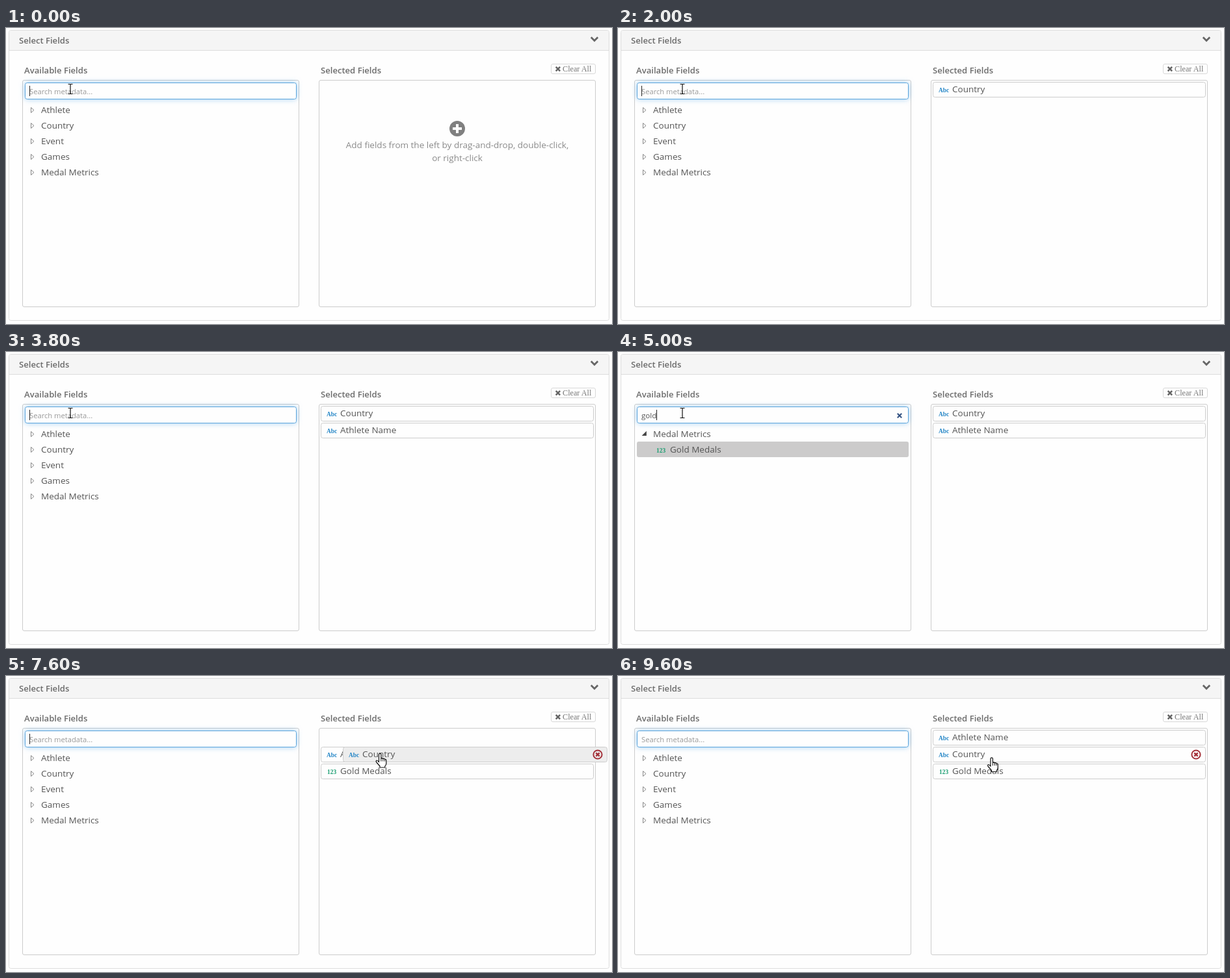
Recreate the animation shown at these times as an HTML page. Size 932 by 456 pixels, loop 9.8 s.

```html
<!DOCTYPE html>
<html lang="en">
<head>
<meta charset="utf-8">
<title>Select Fields</title>
<style>
  html, body { margin: 0; width: 100%; height: 100%; overflow: hidden; background: #fefefe; }
  svg { display: block; width: 932px; height: 456px; }
  text { font: 13.5px "Open Sans", "Noto Sans", sans-serif; fill: #555; white-space: pre; }
  .title { font-size: 13.1px; font-weight: 600; fill: #6b6b6b; }
  .search { font-size: 11.6px; }
  .prompt { font-size: 11.2px; fill: #999; }
  .hint { fill: #8a8a8a; text-anchor: middle; }
  .clear { font: 12.2px "Liberation Serif", Tinos, serif; fill: #777; }
  .kind { font: bold 9.4px "Liberation Serif", Tinos, serif; }
  .Abc { fill: #2385c6; }
  .n123 { fill: #1b9e72; }
  .box { fill: #fefefe; stroke: #ccc; }
  .glow { fill: #fefefe; stroke: #5aa4dc; filter: drop-shadow(0 0 4px rgba(102, 175, 233, .6)); }
  .line { fill: none; }
</style>
</head>
<body>
<svg viewBox="0 0 932 456">
  <rect class="box" x="4.5" y="3.5" width="923" height="447" rx="3" style="stroke:#ddd"/>
  <path d="M5 34V7q0-3 3-3H924q3 0 3 3V34z" fill="#f5f5f5"/>
  <path d="M5 34.5H927" stroke="#ddd"/>
  <text class="title" x="20" y="24">Select Fields</text>
  <path class="line" d="M899.8 14.2L905 19.4L910.2 14.2" stroke="#666" stroke-width="2.8"/>
  <text class="title" x="28" y="70">Available Fields</text>
  <text class="title" x="484" y="70">Selected Fields</text>
  <rect class="box" x="838.5" y="55.5" width="68" height="15" rx="2.5" style="stroke:#d8d8d8"/>
  <path d="M845.7 59.9l6.4 6.4m0-6.4l-6.4 6.4" stroke="#666" stroke-width="2.6"/>
  <text class="clear" x="856" y="67">Clear All</text>
  <rect class="box" x="25.5" y="80.5" width="425" height="349" rx="2.5"/>
  <rect class="box" x="481.5" y="80.5" width="425" height="349" rx="2.5"/>
  <rect class="glow" x="29.5" y="84.5" width="417" height="25" rx="3"/>
  <g id="tree"></g>
  <text id="prompt" class="prompt" x="36" y="102">Search metadata...</text>
  <text id="query" class="search" x="36" y="102"></text>
  <path id="caret" d="M.5 89V105" stroke="#222"/>
  <path id="wipe" d="M429.8 94.8l6.4 6.4m0-6.4l-6.4 6.4" stroke="#2f4f7f" stroke-width="2"/>
  <g id="hint">
    <circle cx="694" cy="155" r="12" fill="#808080"/>
    <path d="M687 155h14m-7-7v14" stroke="#fefefe" stroke-width="4"/>
    <text class="hint" x="694" y="185">Add fields from the left by drag-and-drop, double-click,</text>
    <text class="hint" x="694" y="205">or right-click</text>
  </g>
  <g id="items"></g>
  <path id="beam" class="line" d="M-3.5 -7.5h2.5q1 0 1 1q0 -1 1 -1h2.5M0 -6.5V6.5M-3.5 7.5h2.5q1 0 1 -1q0 1 1 1h2.5" stroke="#111" stroke-width="1.2"/>
  <g id="hand" stroke="#111" stroke-linejoin="round">
    <path fill="#fff" stroke-width="1.2" d="M5 14V2.5a1.7 1.7 0 0 1 3.4 0V8.5q1.6-1.2 3 .5q1.6-.8 2.7 .8q2-.3 2.2 1.7V16q0 3-2 4.5V22.5H6.5V20.5L1 14q-1-2 .8-2.5q1 0 3.2 2.5z"/>
    <path class="line" d="M8.4 8.5V13M11.4 9V13M14.1 10V13"/>
  </g>
</svg>
<script>
const LOOP = 9800, STEP = 200, ROW = 26;
const GRAB = 6800, SWAP = 8000, DROP = 8400;
const GROUPS = ['Athlete', 'Country', 'Event', 'Games', 'Medal Metrics'];

const FIELDS = [
  { group: 'Country', kind: 'Abc', label: 'Country', added: 1600 },
  { group: 'Athlete', kind: 'Abc', label: 'Athlete Name', added: 3600 },
  { group: 'Medal Metrics', kind: '123', label: 'Gold Medals', added: 5400 }
];

const TYPED = [
  [0, ''], [200, 'c'], [400, 'cou'], [600, 'count'], [800, 'country'], [1600, ''],
  [2600, 'a'], [2800, 'athl'], [3000, 'athlete'], [3200, 'athlete na'], [3600, ''],
  [4000, 'g'], [4200, 'go'], [4400, 'gol'], [4600, 'gold'], [5400, '']
];

const CARET_OFF = [[1200, 1400], [2200, 2600], [6600, 7000], [7800, 8000], [8600, 9000], [9600, 9800]];

// time, x, y: text cursor centre first, then the hand's top left corner
const BEAM = [[0, 99, 94], [5600, 130, 94], [5800, 230, 96], [6000, 390, 100]];
const HAND = [
  [6200, 546, 108], [6400, 562.5, 112], [6600, 545, 102], [GRAB, 534.5, 92.5],
  [7000, 558.5, 99.5], [7200, 574.5, 106.5], [7400, 573.5, 113.5], [7600, 568.5, 118.5],
  [7800, 570, 122], [SWAP, 569, 125], [8200, 568, 125]
];

const $ = id => document.getElementById(id);
const at = (table, t) => table.filter(row => row[0] <= t).pop();
const show = (id, on) => $(id).setAttribute('display', on ? 'inline' : 'none');
const move = (id, x, y) => $(id).setAttribute('transform', `translate(${x} ${y})`);
const text = (x, y, label, cls = '') => `<text x="${x}" y="${y}" class="${cls}">${label}</text>`;
const kindMark = (x, y, kind) => text(x, y, kind, kind === 'Abc' ? 'kind Abc' : 'kind n123');

function treeMarkup(query) {
  const hit = query.length > 2 && FIELDS.find(f => f.label.toLowerCase().startsWith(query));
  if (!hit) {
    return GROUPS.map((name, i) => {
      const y = 131 + i * 24;
      return `<path class="line" d="M38.5 ${y - 8.5}l4.5 4l-4.5 4z" stroke="#888"/>` + text(54, y, name);
    }).join('');
  }
  return '<path d="M43.8 121.8V129H36.6z" fill="#444"/>' + text(54, 131, hit.group) +
    '<rect x="29" y="138" width="418" height="24" rx="3" fill="#cccbcb"/>' +
    kindMark(59, 155, hit.kind) + text(80, 155, hit.label);
}

function itemMarkup(field, x, y, width, fill, hover) {
  const cx = x + width - 14.5;
  const cross = `<g class="line" stroke="#a5333b" stroke-width="2">
    <circle cx="${cx}" cy="${y + 11.5}" r="6.6"/>
    <path d="M${cx - 2.7} ${y + 8.8}l5.4 5.4m0-5.4l-5.4 5.4" stroke-width="2.4"/></g>`;
  return `<rect class="box" x="${x}" y="${y}" width="${width}" height="23" rx="3" style="fill:${fill}"/>` +
    kindMark(x + (field.kind === 'Abc' ? 8.5 : 9.5), y + 15.5, field.kind) +
    text(x + 29.5, y + 15.5, field.label) + (hover ? cross : '');
}

function itemsMarkup(t, hand) {
  const list = FIELDS.filter(f => f.added <= t);
  if (t >= SWAP) list.unshift(list.splice(1, 1)[0]);
  const dragging = t > GRAB && t < DROP;
  const hoverRow = hand && !dragging ? Math.floor((hand[2] - 82) / ROW) : -1;
  const rows = list.map((f, i) => dragging && f === FIELDS[0] ? '' :
    itemMarkup(f, 484.5, 83.5 + i * ROW, 419, '#fefefe', i === hoverRow));
  if (dragging) {
    const [, gx, gy] = at(HAND, GRAB);
    rows.push(itemMarkup(FIELDS[0], 484.5 + hand[1] - gx, 83.5 + hand[2] - gy, 406, '#ededed', true));
  }
  return rows.join('');
}

function draw(t) {
  const query = at(TYPED, t)[1];
  const hand = at(HAND, t);
  $('tree').innerHTML = treeMarkup(query);
  $('items').innerHTML = itemsMarkup(t, hand);
  $('query').textContent = query;
  show('prompt', !query);
  show('wipe', query);
  show('hint', t < FIELDS[0].added);
  show('caret', !CARET_OFF.some(([from, to]) => t >= from && t < to));
  move('caret', query ? Math.round(36 + $('query').getComputedTextLength()) : 36, 0);
  show('beam', !hand);
  show('hand', hand);
  const [, x, y] = hand || at(BEAM, t);
  move(hand ? 'hand' : 'beam', x, y);
}

const start = performance.now();
let last = -1;
function tick() {
  const t = Math.floor((performance.now() - start) % LOOP / STEP) * STEP;
  if (t !== last) draw(last = t);
  requestAnimationFrame(tick);
}
tick();
</script>
</body>
</html>
```
